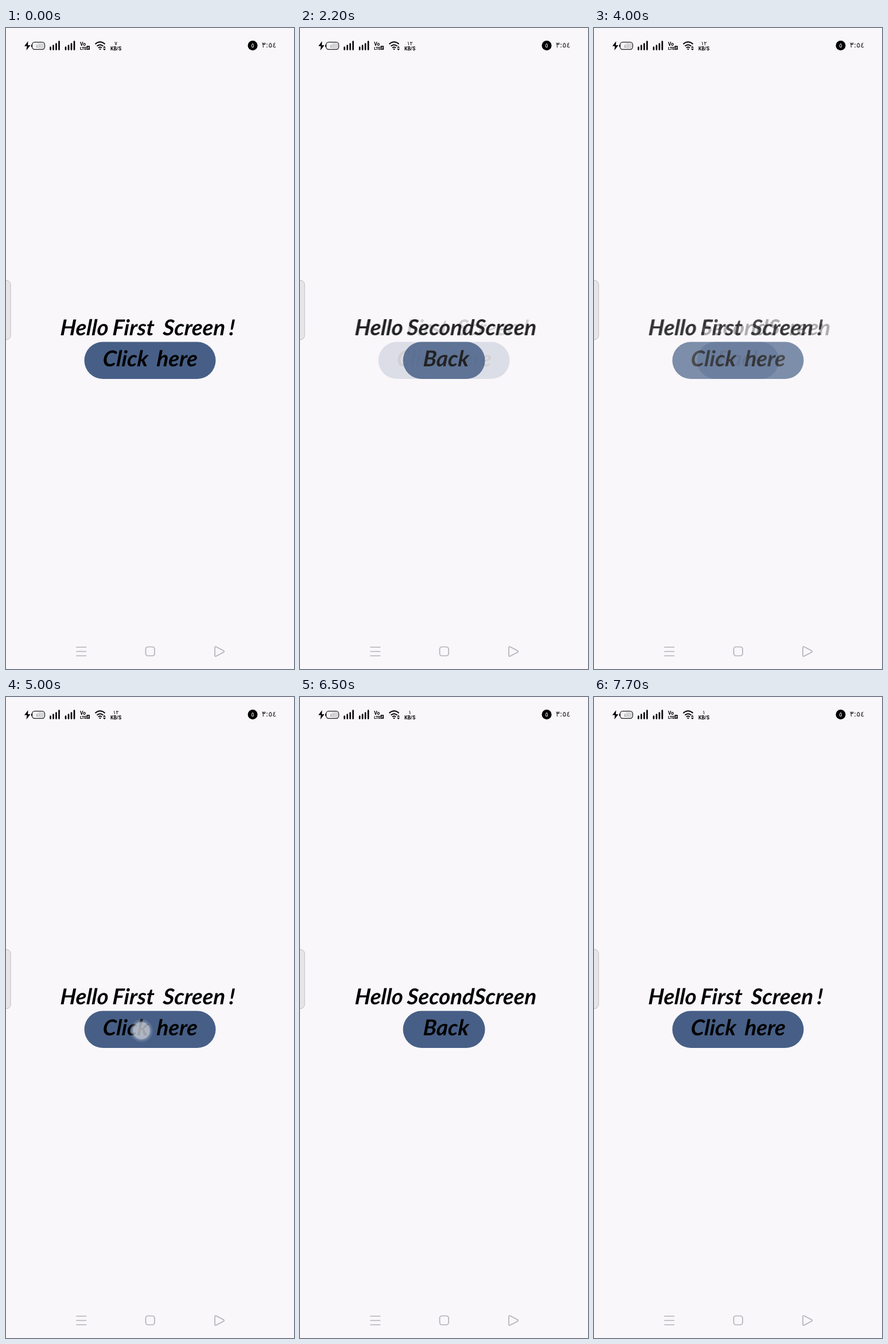
Recreate the animation shown at these times as an HTML page. Size 502 px wide and 1116 px high, loop 8 s.

```html
<!DOCTYPE html>
<html lang="en">
<head>
<meta charset="utf-8">
<title>Two screens</title>
<style>
  html, body { margin: 0; width: 502px; height: 1116px; overflow: hidden; background: #f9f7fa; }
  svg { display: block; }
  .label { font: italic 700 38px Lato, "Open Sans", sans-serif; letter-spacing: .2px; }
  .arabic { font-family: "DejaVu Sans", sans-serif; text-anchor: middle; }
  .small { font: 700 8.5px Roboto, "Liberation Sans", sans-serif; }
  .line { fill: none; stroke: #b4b2b7; stroke-width: 1.7; stroke-linejoin: round; stroke-linecap: round; }
  .pill { fill: #475f86; }
</style>
</head>
<body>
<svg width="502" height="1116" viewBox="0 0 502 1116">
  <defs>
    <radialGradient id="glow">
      <stop offset="0" stop-color="#d4d6dc" stop-opacity=".78"/>
      <stop offset=".68" stop-color="#c8ccd6" stop-opacity=".76"/>
      <stop offset=".76" stop-color="#a9b4c8" stop-opacity=".4"/>
      <stop offset="1" stop-color="#a9b4c8" stop-opacity="0"/>
    </radialGradient>
    <path id="bars" d="M1.5 38v-4M6.5 38v-7M11.5 38v-10M16.5 38v-14" stroke="#000" stroke-width="2.6" stroke-linecap="round"/>
  </defs>

  <!-- status bar -->
  <path d="M38.5 23L32 31.500h4.500L35.500 39L42.500 30h-4.500z"/>
  <rect x="45.500" y="24.700" width="22" height="12.600" rx="4.500" fill="#f4f2f5" stroke="#222" stroke-width="1.300"/>
  <rect x="44" y="29" width="1.500" height="4"/>
  <path d="M56 26.500h8q2 0 2 2v5q0 2-2 2h-8z" fill="#d6d5d9"/>
  <text class="arabic" x="56.500" y="33.500" font-size="8" fill="#777">٤٠</text>
  <use href="#bars" x="76" y="-.5"/>
  <use href="#bars" x="102.500" y="-.5"/>
  <text class="small" x="129" y="30.500">Vo</text>
  <text class="small" x="129" y="38" style="font-size:7.500px;letter-spacing:-.4px">LTE</text>
  <rect x="140.500" y="31" width="5.500" height="7" rx="1"/>
  <path d="M142 33h2.300v1.500h-2v1.800h2.300" fill="none" stroke="#fff" stroke-width=".8"/>
  <path d="M155.500 28q8.500-7.500 17 0M158.500 31.500q5.500-4.500 11 0M161 34.500q3-2.500 6 0" fill="none" stroke="#000" stroke-width="2"/>
  <path d="M162 36h4l-2 2.500zM169 34.500l2.500-3 2.500 3zM169 36l2.500 3 2.500-3z"/>
  <text id="speed" class="arabic" x="191.500" y="30" font-size="9.500"></text>
  <text class="small" x="182" y="38.500">KB/S</text>
  <circle cx="430" cy="30.500" r="8.500"/>
  <text class="arabic" x="430" y="34" font-size="10" fill="#fff">٥</text>
  <text class="arabic" x="458.500" y="34" font-size="13" fill="#222">٣:٥٤</text>

  <!-- side handle -->
  <rect x="-10" y="439.500" width="18" height="103" rx="7" fill="#e7e5e8" stroke="#bdbcc0"/>

  <g id="stage">
    <g id="first">
      <rect class="pill" x="136.500" y="546.500" width="229" height="64.500" rx="32.250"/>
      <g class="label">
        <text transform="translate(0 535) skewX(-4)"><tspan x="94">Hello</tspan><tspan x="185">First</tspan><tspan x="273">Screen</tspan><tspan x="388">!</tspan></text>
        <text transform="translate(0 589) skewX(-4)"><tspan x="168">Click</tspan><tspan x="262">here</tspan></text>
      </g>
    </g>
    <g id="second">
      <rect class="pill" x="179.500" y="546.500" width="143" height="64.500" rx="32.250"/>
      <g class="label">
        <text transform="translate(0 535) skewX(-4)"><tspan x="95">Hello</tspan><tspan x="186">Second</tspan><tspan x="303">Screen</tspan></text>
        <text transform="translate(0 589) skewX(-4)" x="214">Back</text>
      </g>
    </g>
  </g>
  <circle id="touch" r="21" cy="581" fill="url(#glow)"/>

  <!-- navigation bar -->
  <g class="line">
    <path d="M123 1078h16.500M123 1085.500h16.500M123 1093h16.500"/>
    <rect x="243.500" y="1077.500" width="15.500" height="15.500" rx="4"/>
    <path d="M364 1079v13q0 3 2.500 1.500l12.500-6.500q2.500-1.500 0-3l-12.500-6.500q-2.500-1.500-2.500 1.500z"/>
  </g>
</svg>
<script>
const LOOP = 8000, STEP = 100, FADE = 700;
const el = id => document.getElementById(id);
const first = el('first'), second = el('second'), touch = el('touch'), speed = el('speed');

// Each tap is held until its cross-fade starts.
const taps = [
  { down: 1600, up: 1806, x: 231, to: second },
  { down: 3500, up: 3690, x: 250, to: first },
  { down: 5000, up: 5155, x: 236, to: second },
  { down: 6900, up: 7040, x: 250, to: first }
];

// cubic-bezier(.4, 0, .2, 1)
function ease(x) {
  if (x <= 0 || x >= 1) return x <= 0 ? 0 : 1;
  let lo = 0, hi = 1;
  for (let i = 0; i < 24; i++) {
    const s = (lo + hi) / 2, r = 1 - s;
    if (1.2 * r * r * s + .6 * r * s * s + s ** 3 < x) lo = s; else hi = s;
  }
  return lo * lo * (3 - 2 * lo);
}

function draw(t) {
  const fade = taps.filter(p => p.up <= t).pop();
  const top = fade ? fade.to : first;
  const below = top === first ? second : first;
  const alpha = fade ? ease((t - fade.up) / FADE) : 1;
  if (top.nextElementSibling) top.parentNode.append(top);
  top.setAttribute('opacity', alpha);
  below.setAttribute('opacity', 1 - alpha);

  const tap = taps.find(p => t >= p.down && t < p.up);
  touch.setAttribute('opacity', tap ? 1 : 0);
  if (tap) touch.setAttribute('cx', tap.x);

  speed.textContent = t < 1600 ? '٧' : t < 5600 ? '١٢' : '١';
}

const start = performance.now();
function tick() {
  const t = (performance.now() - start) % LOOP;
  draw(Math.floor(t / STEP) * STEP);
  requestAnimationFrame(tick);
}
tick();
</script>
</body>
</html>
```
